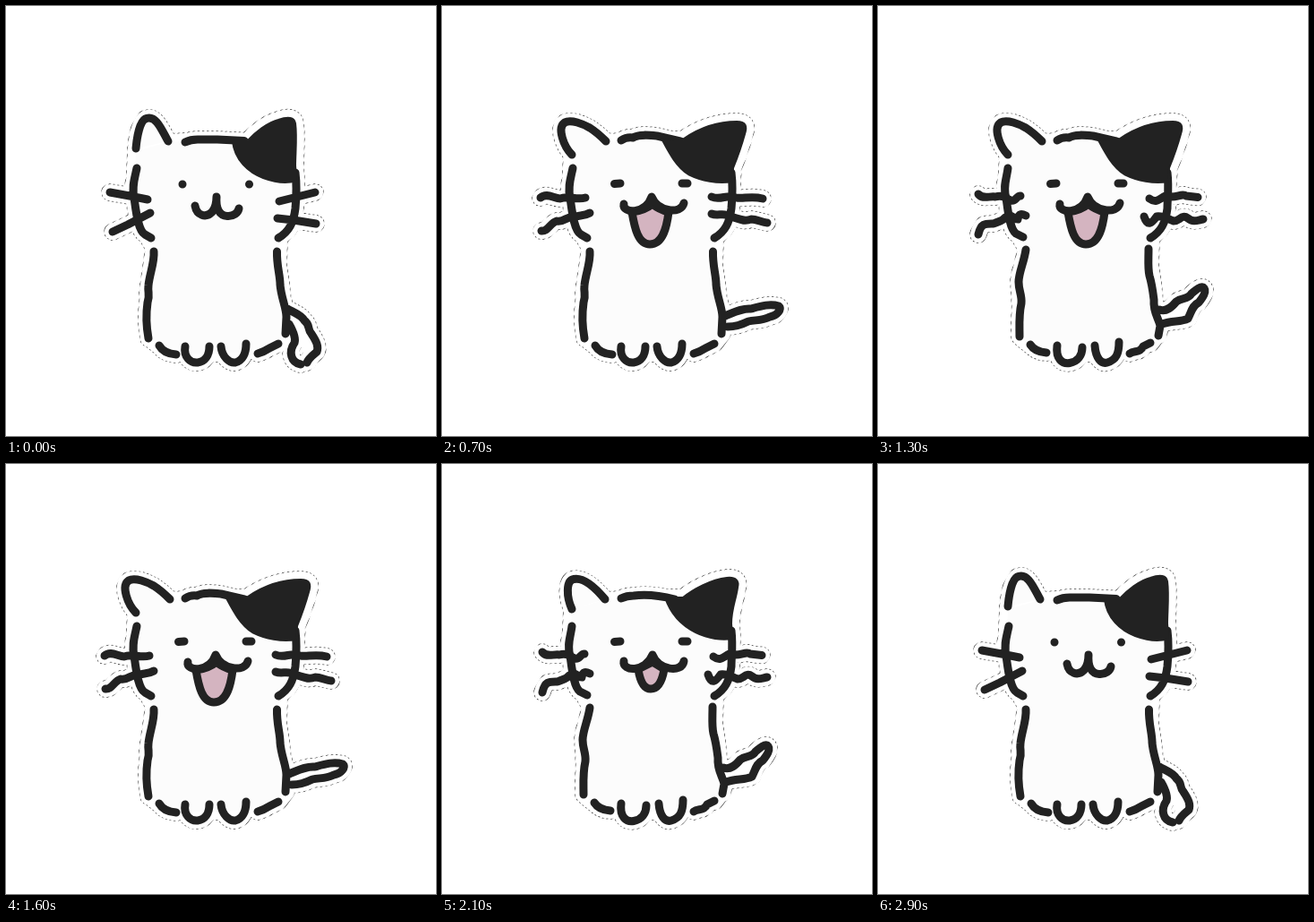
These frames come from a looping animation (480x480 px, 3500 ms). An HTML page:

```html
<!DOCTYPE html>
<html lang="en">
<head>
<meta charset="utf-8">
<title>Happy cat</title>
<style>
  html, body { margin: 0; width: 100%; height: 100%; overflow: hidden; background: #fff; }
  svg { display: block; width: 100vw; height: 100vh; }
  path { stroke-linecap: round; stroke-linejoin: round; fill: none; }
  #edge { stroke: url(#dash); stroke-width: 19.6; }
  #rim { fill: #fff; stroke: #fff; stroke-width: 18.2; }
  #fur { fill: #fcfcfc; }
  #ink { stroke: #222; stroke-width: 9; }
  #patch { fill: #222; stroke: #222; stroke-width: 2; }
  #tongue { fill: #d4b4c0; stroke: #222; stroke-width: 9; }
</style>
</head>
<body>
<svg viewBox="0 0 480 480">
  <defs>
    <pattern id="dash" width="4.4" height="4.4" patternUnits="userSpaceOnUse" patternTransform="rotate(32)">
      <rect width="2" height="4.4" fill="#444"/>
    </pattern>
  </defs>
  <path id="edge"/><path id="rim"/><path id="fur"/>
  <path id="tongue"/><path id="ink"/><path id="patch"/>
</svg>
<script>
const TORSO = 'M145 162L181 152L200 151L262 151L323 185L323 225L305 260L304 290L307 310L313 366L304 377L268 386L240 388L200 388L171 380L160 371L158 320L165 270L148 240L143 205Z';

const EARS = {
  up: {
    left: 'M145 159C146 148 149 127 157 125.500C168 122 174 139 181 151',
    top: 'M200 152Q206 149 214 149L236 149L266 150.500',
    patch: 'M253 151L269 151C278 141 292 130 304 127C315 123 322 124 323 131C325 146 323 165 323 178L324 195C312 199 298 196 287 192C271 186 255 172 253 151Z'
  },
  mid: {
    left: 'M145 162C139 149 138 130 147 128.500C158 126 172 139 182 151',
    top: 'M200 150Q206 147 214 147C228 145 244 147 260 151',
    patch: 'M249 149L269 149C280 140 300 129 318 127C328 126 332 130 330 138C328 152 323 162 323 178L324 195C302 199 262 188 249 149Z'
  },
  out: {
    left: 'M145 166C136 157 128 136 137 130C144 126 158 132 165 136C173 141 178 146 183 151',
    top: 'M200 150Q206 146 213 147C220 143 230 144 240 145L266 151',
    patch: 'M245 148C254 151 262 149 270 148C286 137 305 129 329 129C339 129 341 134 338 143C335 154 331 166 325 181L324 196C308 199 289 195 275 188C261 179 253 163 245 148Z'
  }
};

const EYES = {
  open: 'M197 199h.01M271.500 199h.01',
  shut: 'M192.500 198.500L199 198M268 198h6'
};

const MOUTH = {
  smile: ['M211 223C213 234 223 237 230 230Q235 224 235 213C234 226 238 234 247 234.500C254 235 259 231 260 226'],
  grin: ['M203 219C200 232 228 234 235 213C240 231 268 236 270 221', 'M227 226Q234 240 241 226L235 222Z'],
  half: ['M203 220C201 232 227 233 235 213C241 230 268 234 270 220', 'M219 229C221 242 225 251 233 251C242 251 246 241 248 229L235 221Z'],
  wide: ['M203 221C201 232 227 233 234 213C241 230 267 233 270 220', 'M212 230C215 248 219 266 232 266C247 266 251 246 253 230Q242 227 235 221Q225 229 212 230Z']
};

const WHISKERS = {
  rest: 'M116 208L138 212L158 216M119 252L136 244L161 231M305 218L325 213L345 208M303 237L321 239L346 243',
  low: 'M115 222L135 216L159 213M125 257L143 243L161 230M303 213L322 212L348 214M302 237L320 240L344 249',
  wave: 'M112 210C117 216 124 212 131 213C139 211 142 214 148 217C154 219 154 212 159 212M112 255C115 242 120 243 129 243C135 240 138 241 142 236C150 230 150 238 156 238C157 231 161 232 165 234' +
    'M303 215C311 221 314 215 321 212C332 216 339 208 344 212L357 213.500M297 235C301 247 306 242 311 235C318 234 322 237 330 240C337 240 339 232 346 237C352 242 357 239 363 238',
  wave2: 'M110 214C117 208 125 215 132 215C140 211 150 217 160 214M111 251C118 252 121 242 128 240C136 242 140 234 146 236C153 233 158 235 165 231M301 213C310 217 317 211 325 213C333 217 343 211 358 215M301 232C308 235 315 230 321 235C329 236 336 242 345 238C352 238 357 242 363 242'
};

const TAIL = {
  down: 'M314 338C321 342 330 345 333 351C340 356 336 361 341 366C347 375 349 380 347 386C341 391 338 393 336 398M316 355C320 362 324 370 322 376C315 386 318 398 329 400',
  side: 'M314 338C320 351 338 348 351 352C358 359 349 366 352 371C357 377 364 380 363 385C358 388 356 391 354 393M317 362C325 367 334 364 337 369C335 378 344 383 347 387L354 392',
  high: 'M314 339C322 342 328 336 333 330C339 325 346 328 350 321C355 317 359 313 363 314C368 318 362 326 358 331C351 334 350 341 346 349C338 353 329 351 317 355',
  flat: 'M317 352C328 344 336 339 346 337C355 330 366 328 374 329C379 331 374 340 366 342C358 347 349 345 341 348C334 354 329 356 319 357',
  far: 'M316 346C326 342 335 337 345 338C356 335 366 332 376 335C380 338 374 346 366 347C356 352 350 350 342 352C334 356 328 358 319 358'
};

const BODY = {
  still: 'M146 181C144 191 140 202 143 214C145 228 147 250 155 255L162 259M323 186C325 202 324 215 323 226C321 242 316 252 304 259' +
    'M165 274C166 286 160 300 159 312C158 320 161 322 158 331C156 345 157 360 159 371M302.500 274C302 290 306 300 306 311C307 325 313 337 313 347L312 366' +
    'M171 379Q176 388 190 389M200 380C198 392 206 399 214 398C222 397 227 390 227 380M240 380C241 392 250 399 256 398C264 396 268 388 268 377M281 388Q288 386 294 382L304 377',
  lively: 'M145 181C144 191 139 202 143 214C145 229 147 249 154 254L162 258M323 186C325 203 323 215 323 226C321 242 316 252 304 259' +
    'M165 272C163 286 157 298 157 308C157 318 161 323 160 332C157 345 158 358 158 369M302 271C302 284 301 292 303 301C306 311 307 320 308 328C307 342 313 348 315 357L313 368' +
    'M170 378Q175 386 188 387M200 379C198 394 206 400 214 398.500C223 397 228 390 228 381M242 379C243 393 249 400 256 398C266 395 269 388 269 375M281 388C286 384 292 388 296 380L304 376'
};

const pose = (ears, eyes, mouth, whiskers, tail, body) => {
  const { left, top, patch } = EARS[ears];
  const [lips, tongue = ''] = MOUTH[mouth];
  const lines = left + top + WHISKERS[whiskers] + TAIL[tail] + BODY[body];
  const shape = TORSO + patch + lines;
  return { edge: shape, rim: shape, fur: TORSO + left, tongue, patch, ink: lines + lips + EYES[eyes], small: mouth === 'grin' };
};

const rest = pose('up', 'open', 'smile', 'rest', 'down', 'still');
const perk = pose('up', 'open', 'grin', 'low', 'side', 'still');
const grin = pose('up', 'shut', 'grin', 'low', 'side', 'still');
const lift = pose('mid', 'shut', 'half', 'wave', 'high', 'lively');
const wagA = pose('out', 'shut', 'wide', 'wave2', 'far', 'still');
const wagB = pose('out', 'shut', 'wide', 'wave', 'high', 'lively');
const calm = pose('up', 'shut', 'grin', 'low', 'flat', 'still');
const wake = pose('up', 'open', 'grin', 'low', 'flat', 'still');

const LOOP = 3500;
const STEPS = [
  [0, rest], [300, perk], [400, grin], [600, lift], [700, wagA],
  [1000, wagB], [1100, wagA], [1300, wagB], [1600, wagA], [1800, wagB],
  [2100, lift], [2400, calm], [2700, wake], [2900, rest]
];
const layers = ['edge', 'rim', 'fur', 'tongue', 'patch', 'ink'].map(id => document.getElementById(id));
const tongue = document.getElementById('tongue');

const start = performance.now();
let shown;
function draw() {
  const t = (performance.now() - start) % LOOP;
  const now = STEPS.findLast(([at]) => at <= t)[1];
  if (now !== shown) {
    shown = now;
    for (const el of layers) el.setAttribute('d', now[el.id]);
    tongue.style.strokeWidth = now.small ? 6 : 9;
  }
  requestAnimationFrame(draw);
}
draw();
</script>
</body>
</html>
```
